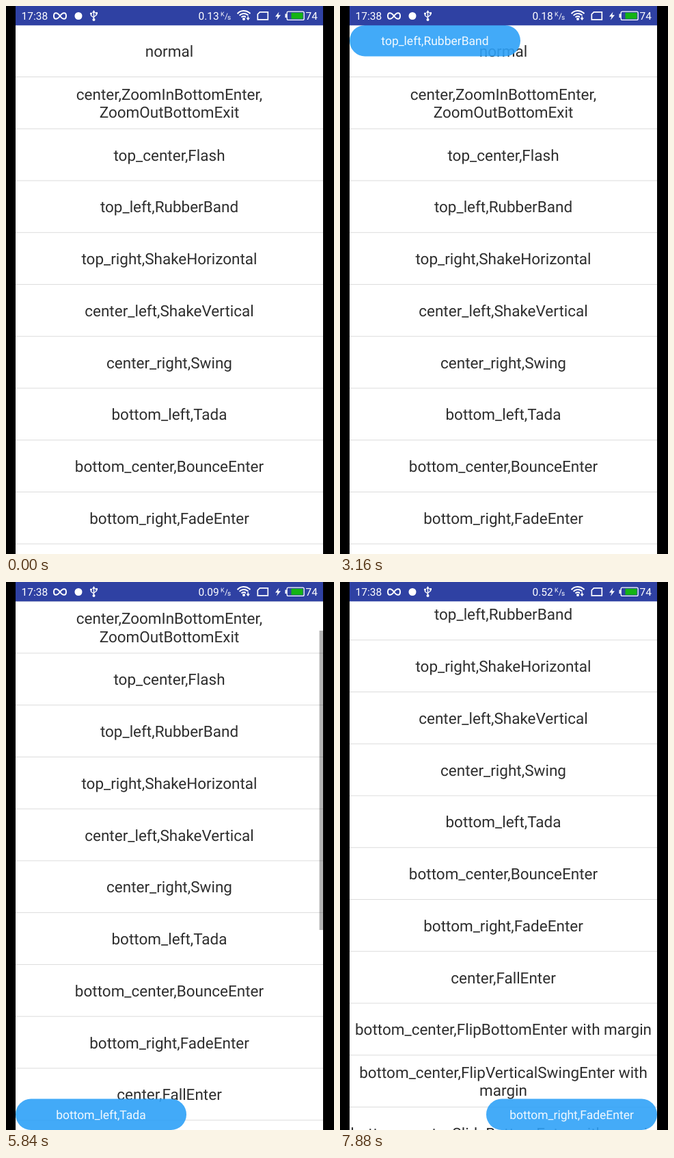
An HTML page with a canvas for the animation above (8000 ms loop, 480 by 800 pixels).

```html
<!DOCTYPE html>
<html lang="en">
<head>
<meta charset="utf-8">
<title>Toast animations</title>
<style>
html, body { margin: 0; width: 100%; height: 100%; overflow: hidden; background: #000; }
canvas { display: block; width: 480px; height: 800px; }
</style>
</head>
<body>
<canvas id="stage" width="480" height="800"></canvas>
<script>
const ctx = document.getElementById('stage').getContext('2d');
const LOOP = 8000, ANIM = 500;
const LEFT = 14, WIDTH = 450, TOP = 28.3, ROW = 75.75;
const PX = 1 / 2.4; // device pixels to stage pixels

const ROWS = [
  'normal',
  'center,ZoomInBottomEnter,|ZoomOutBottomExit',
  'top_center,Flash',
  'top_left,RubberBand',
  'top_right,ShakeHorizontal',
  'center_left,ShakeVertical',
  'center_right,Swing',
  'bottom_left,Tada',
  'bottom_center,BounceEnter',
  'bottom_right,FadeEnter',
  'center,FallEnter',
  'bottom_center,FlipBottomEnter with margin',
  'bottom_center,FlipVerticalSwingEnter with|margin',
  'bottom_center,SlideBottomEnter with margin'
];

const clamp = v => Math.min(1, Math.max(0, v));
const ease = p => (1 - Math.cos(Math.PI * p)) / 2;
const cycle = p => -10 + 20 * Math.sin(10 * Math.PI * p);

// Evenly spaced keyframes with linear steps
function keys(values, f) {
  const n = values.length - 1;
  const i = Math.min(n - 1, Math.floor(f * n));
  return values[i] + (values[i + 1] - values[i]) * (f * n - i);
}

// Each effect takes raw progress p and eased progress f
const zoomIn = (p, f) => {
  const s = keys([0.1, 0.475, 1], f);
  return { sx: s, sy: s, y: keys([125, -60, 0], f), alpha: keys([0, 1, 1], f) };
};
const zoomOut = (p, f) => {
  const s = keys([1, 0.475, 0.1], f);
  return { sx: s, sy: s, y: keys([0, -60, 125], f), alpha: keys([1, 1, 0], f) };
};
const flash = (p, f) => ({ alpha: keys([1, 0, 1, 0, 1], f) });
const rubber = (p, f) => ({
  sx: keys([1, 1.25, 0.75, 1.15, 1], f),
  sy: keys([1, 0.75, 1.25, 0.85, 1], f)
});
const shakeX = p => ({ x: cycle(p) });
const shakeY = p => ({ y: cycle(p) });
const swing = (p, f) => ({ rot: keys([0, 10, -10, 6, -6, 3, -3, 0], f) });
const tada = (p, f) => {
  const s = keys([1, 0.9, 0.9, 1.1, 1.1, 1.1, 1.1, 1.1, 1.1, 1], f);
  return { sx: s, sy: s, rot: keys([0, -3, -3, 3, -3, 3, -3, 3, -3, 0], f) };
};
const bounce = (p, f) => ({
  y: keys([750, -30, 10, 0], f),
  alpha: keys([0, 1, 1, 1], f)
});
const fade = (p, f) => ({ alpha: f });
const none = () => ({});

// Label row, centre x, centre y, start time, entry effect, exit effect
const TOASTS = [
  [0, 239, 680.3, 255, none],
  [1, 239, 413.9, 950, zoomIn, zoomOut],
  [2, 239, 50.7, 1655, flash],
  [3, 139, 50.7, 2375, rubber],
  [4, 339, 50.7, 3135, shakeX],
  [5, 139, 413.9, 3788, shakeY],
  [6, 339, 413.9, 4375, swing],
  [7, 139, 777.3, 5135, tada],
  [8, 239, 777.3, 6640, bounce],
  [9, 339, 777.3, 7415, fade]
].map(([row, x, y, start, enter, exit], i, all) => ({
  label: ROWS[row], x, y, start, enter, exit,
  end: i + 1 < all.length ? all[i + 1][3] : Infinity
}));

const SPEEDS = [[7480, '0.52'], [5480, '0.09'], [3880, '0.17'], [800, '0.18'], [0, '0.13']];

function label(text, x, y, size, color) {
  ctx.font = `${size}px Roboto, sans-serif`;
  ctx.textAlign = 'center';
  ctx.fillStyle = color;
  const lines = text.split('|'), step = size * 1.172;
  lines.forEach((line, i) => {
    ctx.fillText(line, x, y + size * 0.342 + (i - (lines.length - 1) / 2) * step);
  });
}

function drawList(t) {
  const p = clamp((t - 5612) / 800) ** 0.8;
  const scroll = 246 * p * p * (3 - 2 * p);
  ctx.fillStyle = '#fff';
  ctx.fillRect(LEFT, 0, WIDTH, 800);
  ROWS.forEach((text, i) => {
    const mid = 66.35 + i * ROW - scroll;
    if (mid < -20 || mid > 850) return;
    label(text, 239, mid, 22.5, '#2e2e2e');
    ctx.fillStyle = '#dcdcdc';
    ctx.fillRect(LEFT, mid + 36.6, WIDTH, 1);
  });
  const shown = t < 5612 ? 0 : 1 - clamp((t - 6560) / 240);
  if (shown) {
    ctx.fillStyle = `rgba(0,0,0,${0.29 * shown})`;
    ctx.fillRect(458.6, TOP + scroll * 0.567, 5.4, 437);
  }
}

function drawToast(toast, t) {
  const age = t - toast.start, left = t - toast.end;
  if (age < 0 || left > ANIM) return;
  const progress = ms => clamp((ms - 55) / 275);
  let p = clamp(age / ANIM), effect = toast.enter;
  if (left > 0 && toast.exit) {
    p = clamp(left / ANIM);
    effect = toast.exit;
  }
  const { x = 0, y = 0, sx = 1, sy = 1, rot = 0, alpha = 1 } = effect(p, ease(p));
  const two = toast.label.includes('|');
  const w = two ? 292 : 250, h = two ? 52.5 : 45.4;
  ctx.save();
  ctx.globalAlpha = alpha * progress(age) * (1 - progress(left));
  ctx.translate(toast.x + x * PX, toast.y + y * PX);
  ctx.rotate(rot * Math.PI / 180);
  ctx.scale(sx, sy);
  ctx.fillStyle = 'rgba(46,161,248,0.9)';
  ctx.beginPath();
  ctx.roundRect(-w / 2, -h / 2, w, h, 22.6);
  ctx.fill();
  label(toast.label, 0, 0.6, 17.5, 'rgba(255,255,255,0.93)');
  ctx.restore();
}

function path(points, close) {
  ctx.beginPath();
  points.forEach(([x, y]) => ctx.lineTo(x, y));
  if (close) ctx.closePath();
}

function dot(x, y, r) {
  ctx.beginPath();
  ctx.arc(x, y, r, 0, 7);
  ctx.fill();
}

function write(text, x, y, size) {
  ctx.font = `${size}px Roboto, sans-serif`;
  ctx.fillText(text, x, y);
}

function drawUsb() {
  ctx.lineWidth = 1.4;
  path([[128.5, 8], [128.5, 20]]);
  ctx.stroke();
  path([[124.5, 11], [124.5, 14], [128.5, 17]]);
  ctx.stroke();
  path([[132.5, 10], [132.5, 13], [128.5, 16]]);
  ctx.stroke();
  path([[126, 10], [128.5, 6], [131, 10]], true);
  ctx.fill();
  dot(128.5, 20, 2);
  dot(124.5, 11, 1.6);
  ctx.fillRect(131, 9, 3, 3);
}

function drawWifi(t) {
  ctx.lineWidth = 2;
  [4.5, 8.5, 12.5].forEach(r => {
    ctx.beginPath();
    ctx.arc(348, 19.5, r, -Math.PI * 0.77, -Math.PI * 0.23);
    ctx.stroke();
  });
  dot(348, 19, 2);
  if (t >= 1440 && t < 1900) return;
  ctx.fillStyle = '#2f41a3';
  ctx.fillRect(351, 14.5, 8, 7);
  ctx.fillStyle = '#fff';
  path([[351.5, 17.5], [357, 17.5], [354.2, 21]], true);
  ctx.fill();
  ctx.fillRect(353.5, 15, 1.5, 3);
}

function drawStatus(t) {
  ctx.fillStyle = '#2f41a3';
  ctx.fillRect(LEFT, 0, WIDTH, TOP);
  ctx.fillStyle = ctx.strokeStyle = '#fff';
  ctx.textAlign = 'left';
  write('17:38', 22.5, 20, 15.5);
  write(SPEEDS.find(s => t >= s[0])[1], 281.5, 20, 15.5);
  write('K', 314, 14.5, 9);
  write('/', 320, 18.5, 12);
  write('s', 324, 20, 10);
  write('74', 438.5, 20, 15.5);

  ctx.lineWidth = 2;
  ctx.beginPath();
  ctx.moveTo(79, 14.5);
  ctx.bezierCurveTo(83, 9, 88, 8.5, 88, 14.5);
  ctx.bezierCurveTo(88, 20.5, 83, 20, 79, 14.5);
  ctx.bezierCurveTo(75, 9, 70, 8.5, 70, 14.5);
  ctx.bezierCurveTo(70, 20.5, 75, 20, 79, 14.5);
  ctx.stroke();
  dot(106, 14.5, 5.5);
  drawUsb();
  drawWifi(t);

  ctx.lineWidth = 1.7;
  path([[371.5, 8.8], [383.3, 8.8], [383.3, 19.8], [368.3, 19.8], [368.3, 12]], true);
  ctx.stroke();
  path([[399.5, 8.5], [394, 15.5], [397.5, 15.5], [396, 20.5], [402, 13.2], [398.4, 13.2]], true);
  ctx.fill();

  ctx.lineWidth = 1.3;
  ctx.beginPath();
  ctx.roundRect(411.2, 8.2, 25, 12.2, 2);
  ctx.stroke();
  ctx.fillRect(408.5, 11.5, 2.5, 5.5);
  ctx.fillStyle = '#14b414';
  ctx.fillRect(417.5, 9.8, 17, 9);
}

function draw(t) {
  ctx.fillStyle = '#000';
  ctx.fillRect(0, 0, 480, 800);
  ctx.save();
  ctx.textRendering = 'geometricPrecision';
  ctx.beginPath();
  ctx.rect(LEFT, 0, WIDTH, 800);
  ctx.clip();
  drawList(t);
  ctx.fillStyle = '#fff';
  TOASTS.forEach(toast => drawToast(toast, t));
  drawStatus(t);
  ctx.restore();
}

const begin = performance.now();
function tick() {
  draw((performance.now() - begin) % LOOP);
  requestAnimationFrame(tick);
}
tick();
</script>
</body>
</html>
```
